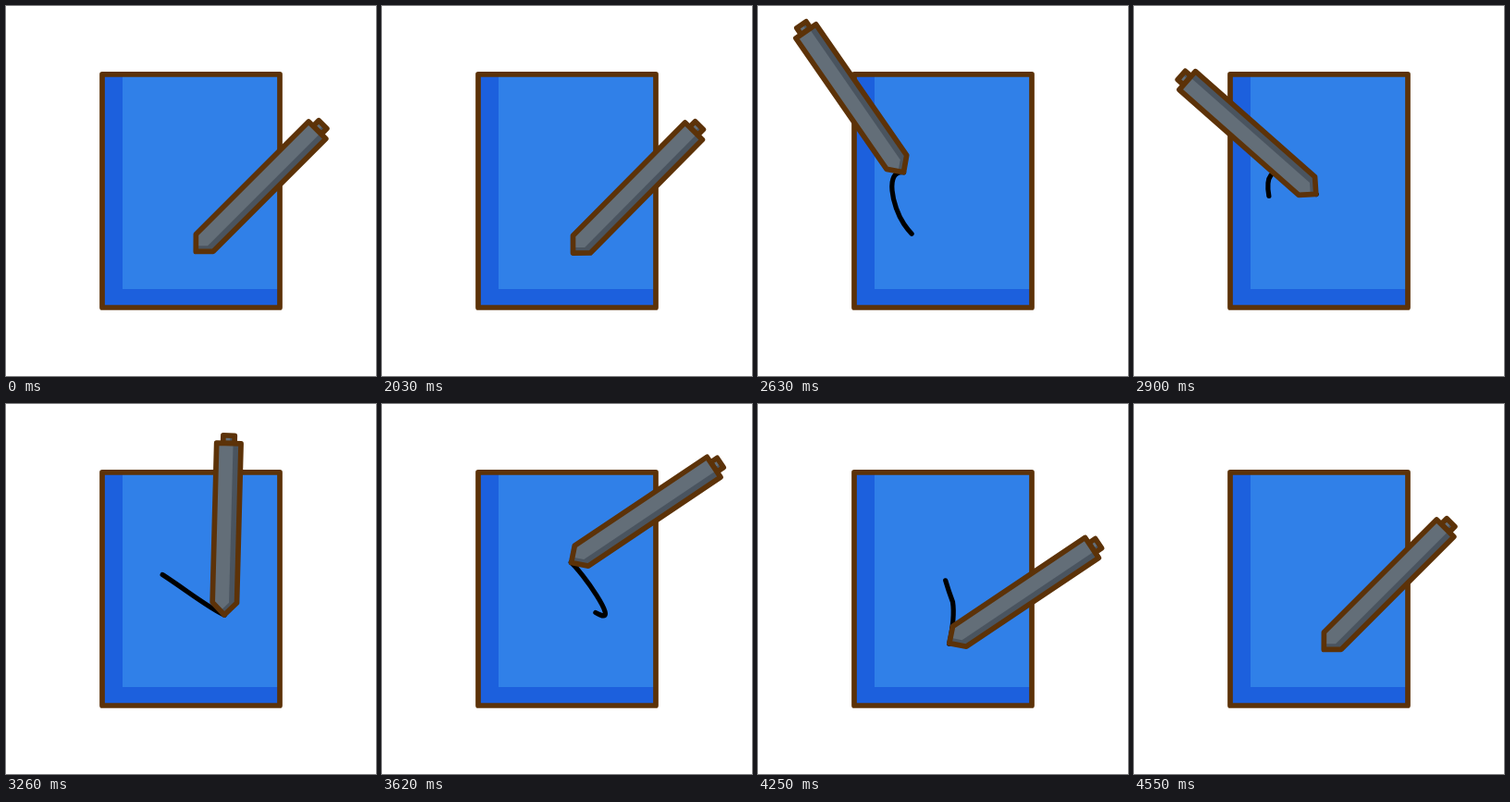
Animation of 400 by 400 pixels, one loop 4.64 s. Source, as an HTML page with a canvas:

```html
<!DOCTYPE html>
<html lang="en">
<head>
<meta charset="utf-8">
<title>Notebook and pen</title>
<style>
  html, body { margin: 0; width: 100%; height: 100%; overflow: hidden; background: #fff; }
  canvas { display: block; width: 100vmin; height: 100vmin; }
</style>
</head>
<body>
<canvas id="stage" width="400" height="400"></canvas>
<script>
const ctx = document.getElementById('stage').getContext('2d');

const LOOP = 4640, STEP = 30, START = 2000, END = 4550;
const OUTLINE = '#5c3208', LINE = 5.7;
const TRAIL_LENGTH = 80, TRAIL_WIDTH = 5.2, TRAIL_FADE = 4160;
const REST = { x: 205.3, y: 265.4 };

// The scribble: each curve and the time the pen reaches its end
const scribbleStart = 'M207 267';
const legs = [
  { until: 2420, curve: 'C189 269 170 253.6 157.8 235.7' },
  { until: 2685, curve: 'C143 214 134 163 170 185' },
  { until: 3260, curve: 'C196 202 220 221 236 228' },
  { until: 3625, curve: 'C256 237 215 180 204 171' },
  { until: 4010, curve: 'C193 162 203 194 210.5 214' },
  { until: 4340, curve: 'C213 230 209 250 205.3 265.4' }
];

// Pen angles from upright at the ends of three equal swings
const tilts = [45, -49.5, 58.5, 45];

const clamp01 = v => Math.min(1, Math.max(0, v));
const easeSine = p => 0.5 - 0.5 * Math.cos(Math.PI * p);

const scribble = document.createElementNS('http://www.w3.org/2000/svg', 'path');
const marks = [{ time: START, length: 0 }];
let outlineData = scribbleStart;
for (const { until, curve } of legs) {
  outlineData += curve;
  scribble.setAttribute('d', outlineData);
  marks.push({ time: until, length: scribble.getTotalLength() });
}
const trailPath = new Path2D(outlineData);

// Smooth, never reversing speed through the marks
const rate = i => (marks[i + 1].length - marks[i].length) / (marks[i + 1].time - marks[i].time);
const speeds = marks.map((_, i) => {
  if (i === 0 || i === marks.length - 1) return 0;
  const before = rate(i - 1), after = rate(i);
  return 2 * before * after / (before + after);
});

function distanceAt(t) {
  let i = 0;
  while (i < legs.length - 1 && t > marks[i + 1].time) i++;
  const a = marks[i], b = marks[i + 1], span = b.time - a.time;
  const u = clamp01((t - a.time) / span), v = 1 - u;
  return a.length + (b.length - a.length) * u * u * (3 - 2 * u)
    + span * u * v * (speeds[i] * v - speeds[i + 1] * u);
}

function tiltAt(t) {
  const swing = (t - START) / (END - START) * 3;
  const i = Math.min(2, Math.floor(swing));
  const p = swing - i;
  // The last swing lingers before it falls back
  const eased = easeSine(i === 2 ? p ** 3 : p);
  return tilts[i] + (tilts[i + 1] - tilts[i]) * eased;
}

function trace(points) {
  ctx.beginPath();
  points.forEach(([x, y]) => ctx.lineTo(x, y));
  ctx.closePath();
}

function outline() {
  ctx.strokeStyle = OUTLINE;
  ctx.lineWidth = LINE;
  ctx.lineJoin = 'round';
  ctx.stroke();
}

// Dark shape with a lighter copy shifted left inside it
function shaded(points, shift) {
  ctx.save();
  trace(points);
  ctx.clip();
  ctx.fillStyle = '#4a545f';
  ctx.fill();
  trace(points.map(([x, y]) => [x - shift, y]));
  ctx.fillStyle = '#636e78';
  ctx.fill();
  ctx.restore();
  trace(points);
  outline();
}

function drawBook() {
  ctx.fillStyle = '#1c60dd';
  ctx.fillRect(104, 73.8, 192, 252.2);
  ctx.fillStyle = '#3080e8';
  ctx.fillRect(126, 73.8, 170, 232.2);
  ctx.beginPath();
  ctx.rect(104, 73.8, 192, 252.2);
  outline();
}

function drawTrail(from, to) {
  if (to - from < 0.5) return;
  ctx.save();
  ctx.strokeStyle = '#000';
  ctx.lineWidth = TRAIL_WIDTH;
  ctx.lineCap = ctx.lineJoin = 'round';
  ctx.setLineDash([to - from, 2000]);
  ctx.lineDashOffset = -from;
  ctx.stroke(trailPath);
  ctx.restore();
}

function drawPen(tip, degrees) {
  ctx.save();
  ctx.translate(tip.x, tip.y);
  ctx.rotate(degrees * Math.PI / 180);
  shaded([[-6.2, -185.5], [-6.2, -194], [6.2, -194], [6.2, -185.5]], 5);
  shaded([[0, 0], [-13.2, -13.3], [-13.2, -185.5], [13.2, -185.5], [13.2, -13.3]], 8.5);
  ctx.restore();
}

function render(time) {
  const t = START + Math.floor((time - START) / STEP) * STEP;
  ctx.fillStyle = '#fff';
  ctx.fillRect(0, 0, 400, 400);
  drawBook();
  if (t <= START || t >= END) {
    drawPen(REST, 45);
    return;
  }
  const head = distanceAt(t);
  const fade = easeSine(clamp01((t - TRAIL_FADE) / (END - TRAIL_FADE)));
  drawTrail(Math.max(0, head - TRAIL_LENGTH * (1 - fade)), head);
  drawPen(scribble.getPointAtLength(head), tiltAt(t));
}

const begin = performance.now();
function tick() {
  render((performance.now() - begin) % LOOP);
  requestAnimationFrame(tick);
}
tick();
</script>
</body>
</html>
```
